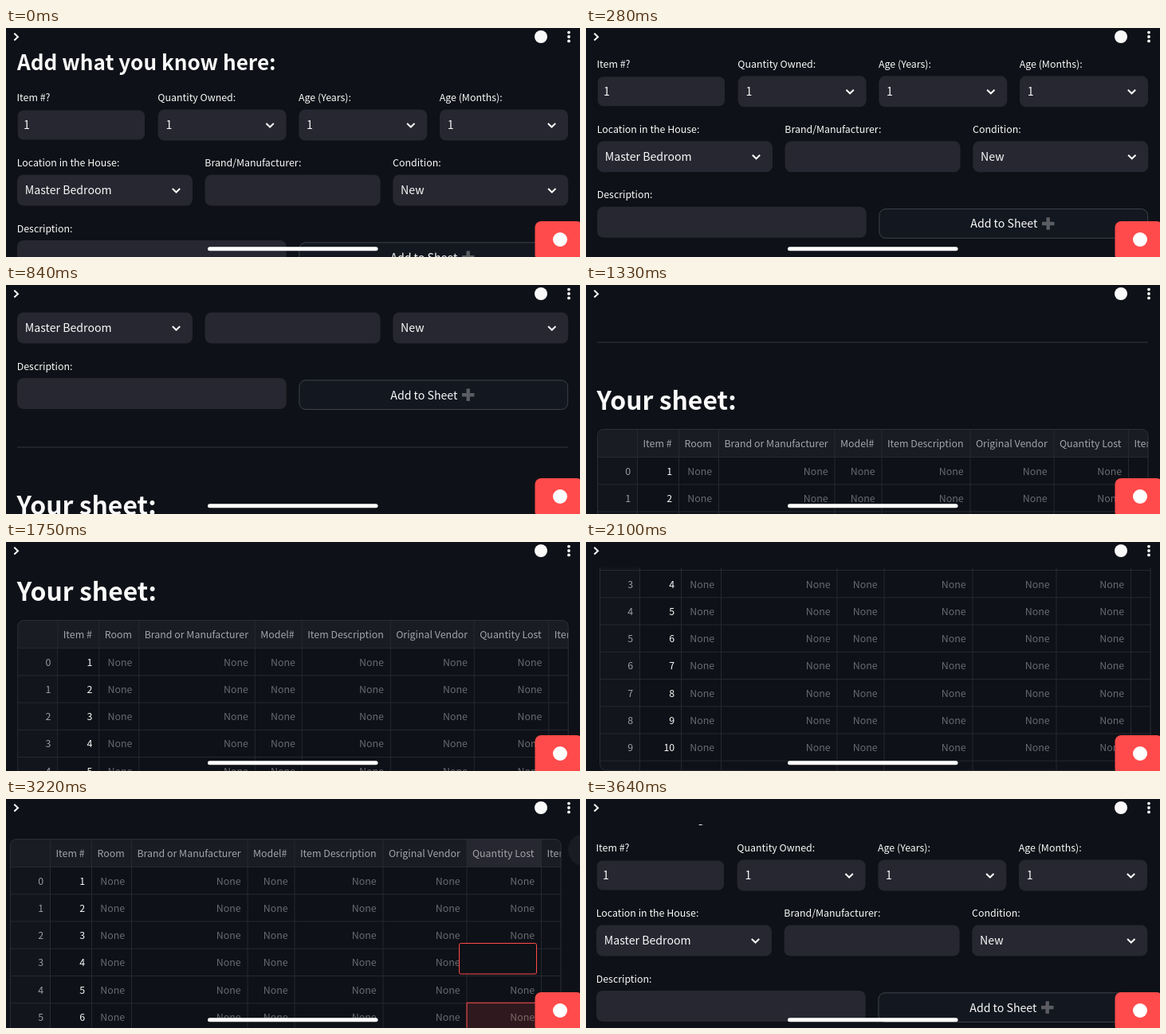
Animation of 720x288 px, one loop 3.71 s. Source, as an HTML page with a canvas:

```html
<!DOCTYPE html>
<html lang="en">
<head>
<meta charset="utf-8">
<title>Inventory form scroll</title>
<style>
html, body { margin: 0; width: 100%; height: 100%; overflow: hidden; background: #0e1117; }
canvas { display: block; }
</style>
</head>
<body>
<canvas id="stage" width="720" height="288"></canvas>
<script>
const ctx = document.getElementById('stage').getContext('2d');
const LOOP = 3710, STEP = 70;
const BG = '#0e1117', FIELD = '#262730', INK = '#fafafa', GRID = '#26292f', RED = '#ff4b4b';
const FAMILY = '"Noto Sans CJK JP", "Noto Sans CJK SC", "Noto Sans", sans-serif';
const LABEL = 12.4, VALUE = 14.15;

// [time, value] keys: vertical scroll and sideways drift of the page
const scrollKeys = [[0, 0], [560, 108], [840, 150], [1050, 150], [1330, 282], [1540, 330], [1610, 330],
  [2100, 565.7], [2590, 743.5], [2730, 752], [2800, 752], [3150, 488], [3220, 413], [3640, 26], [3710, 0]];
const driftKeys = [[0, 0], [1610, 0], [2100, 3], [2170, 8], [2280, 13], [2590, 0], [2870, 0],
  [3150, -18], [3220, -9], [3640, -1], [3710, 0]];

// Monotone cubic interpolation
function sample(keys, t) {
  const slope = i => keys[i + 1] && keys[i] ? (keys[i + 1][1] - keys[i][1]) / (keys[i + 1][0] - keys[i][0]) : 0;
  const tangent = i => {
    const a = slope(i - 1), b = slope(i);
    return a * b > 0 ? 2 * a * b / (a + b) : 0;
  };
  let i = 0;
  while (i < keys.length - 2 && t >= keys[i + 1][0]) i++;
  const [t0, v0] = keys[i], [t1, v1] = keys[i + 1];
  const h = t1 - t0, u = (t - t0) / h, w = 1 - u;
  return w * w * (1 + 2 * u) * v0 + u * u * (3 - 2 * u) * v1
    + h * u * w * (w * tangent(i) - u * tangent(i + 1));
}

function text(str, x, y, size, color = INK, align = 'left', weight = 400) {
  ctx.font = `${weight} ${size}px ${FAMILY}`;
  ctx.textAlign = align;
  ctx.fillStyle = color;
  ctx.fillText(str, x, y);
}

function rect(x, y, w, h, color) {
  ctx.fillStyle = color;
  ctx.fillRect(x, y, w, h);
}

function box(x, y, w, h, r, fill, stroke) {
  ctx.beginPath();
  ctx.roundRect(x, y, w, h, r);
  if (fill) { ctx.fillStyle = fill; ctx.fill(); }
  if (stroke) { ctx.strokeStyle = stroke; ctx.lineWidth = 1; ctx.stroke(); }
}

function disc(x, y, r, color) {
  ctx.beginPath();
  ctx.arc(x, y, r, 0, 7);
  ctx.fillStyle = color;
  ctx.fill();
}

function line(points, color, width) {
  ctx.beginPath();
  points.forEach(([x, y]) => ctx.lineTo(x, y));
  ctx.strokeStyle = color;
  ctx.lineWidth = width;
  ctx.stroke();
}

function field(label, x, y, w, value, isSelect) {
  text(label, x - .3, y - 10.5, LABEL);
  box(x, y, w, 39, 8, FIELD);
  if (value) text(value, x + 9.8, y + 24.8, VALUE);
  if (isSelect) {
    const cx = x + w - 20.5;
    line([[cx - 4.7, y + 17.5], [cx, y + 22], [cx + 4.7, y + 17.5]], INK, 2);
  }
}

function drawForm() {
  text('Add what you know here:', 14, 52.5, 26.1, INK, 'left', 600);

  text('Item #?', 13.4, 92, LABEL);
  box(14.7, 103.5, 159.3, 37, 7, FIELD);
  text('1', 22, 127.3, VALUE);
  ['Quantity Owned:', 'Age (Years):', 'Age (Months):'].forEach((label, i) =>
    field(label, 190.6 + 176.7 * i, 102.5, 161, '1', true));

  field('Location in the House:', 14, 184.5, 220, 'Master Bedroom', true);
  field('Brand/Manufacturer:', 249.6, 184.5, 220);
  field('Condition:', 485.3, 184.5, 220, 'New', true);

  field('Description:', 14, 267, 337.7);
  box(367.9, 269.8, 336.8, 36.7, 8, '#131720', '#3f4248');
  text('Add to Sheet', 482.3, 293.5, VALUE);
  rect(572, 286, 15.5, 4.4, '#5b5d62');
  rect(577.5, 280.4, 4.4, 15.5, '#5b5d62');

  rect(14, 353.5, 691, 1, '#34373d');
  text('Your sheet:', 13.6, 439, 31.9, INK, 'left', 700);
}

const columns = ['', 'Item #', 'Room', 'Brand or Manufacturer', 'Model#', 'Item Description',
  'Original Vendor', 'Quantity Lost', 'Item Age'];
const edges = [14, 64.5, 116.5, 166.5, 312, 371, 482, 587, 680.5, 775];
const TOP = 463, ROWS_TOP = 498.5, ROW = 34.25, BOTTOM = 853.5, LOST = 7, PICKED = 5;

function drawTable(picked) {
  ctx.save();
  ctx.beginPath();
  ctx.roundRect(14, TOP, 691.5, BOTTOM - TOP, 8);
  ctx.clip();
  rect(14, TOP, 692, ROWS_TOP - TOP, '#1a1c24');
  rect(14, ROWS_TOP, 50.5, BOTTOM - ROWS_TOP, '#12151c');
  if (picked) rect(edges[LOST], TOP, edges[LOST + 1] - edges[LOST], ROWS_TOP - TOP, FIELD);

  columns.forEach((name, c) => {
    const right = edges[c + 1] - 8.3;
    text(name, edges[c] + 6.9, 486, LABEL, '#a2a4a8');
    for (let r = 0; r < 10; r++) {
      const y = 520.5 + ROW * r;
      if (c === 0) text(r, right, y, LABEL, '#9c9ea2', 'right');
      else if (c === 1) text(r + 1, right, y, LABEL, INK, 'right');
      else text('None', right, y, LABEL, '#686a6f', 'right');
    }
    if (c) rect(edges[c] - .5, TOP, 1, BOTTOM - TOP, GRID);
  });
  for (let r = 0; r <= 10; r++) rect(14, ROWS_TOP + ROW * r - .5, 692, 1, GRID);

  if (picked) {
    box(edges[LOST], ROWS_TOP + ROW * PICKED - .5, edges[LOST + 1] - edges[LOST], ROW, 0,
      'rgba(255,75,75,.14)', RED);
  }
  ctx.restore();
  box(14.5, TOP + .5, 690.5, BOTTOM - TOP - 1, 8, null, '#2b2e34');
  if (picked) disc(734, 477, 20, '#1a1c24');
}

function drawFinish() {
  box(14.5, 876.3, 111, 36.7, 8, '#131720', '#45484e');
  text('Finished?', 26.2, 900, VALUE);
  box(93.5, 885, 19.3, 19, 3, '#12bd16', '#0b8f10');
  line([[97.5, 895], [101.5, 900], [109, 888.5]], '#fff', 2.6);
}

function drawChrome() {
  rect(0, 0, 720, 32, BG);
  line([[10.3, 6.8], [15, 11.2], [10.3, 15.6]], INK, 2);
  disc(671, 11, 8, INK);
  [5.6, 11, 16.4].forEach(y => disc(706, y, 1.9, INK));
  box(663.5, 243, 60, 50, 8, RED);
  disc(695, 266, 9, '#fff');
  box(253, 275.2, 213.5, 5, 2.5, '#fff');
}

function draw(now) {
  const t = Math.floor(now % LOOP / STEP) * STEP;
  rect(0, 0, 720, 288, BG);
  ctx.save();
  ctx.translate(sample(driftKeys, t), -sample(scrollKeys, t));
  drawForm();
  drawTable(t >= 3150);
  drawFinish();
  ctx.restore();
  // Cell editor stays put while the page moves
  if (t >= 3150 && t < 3430) box(568.5, 181.5, 97, 38.5, 2, BG, RED);
  drawChrome();
}

let start;
function tick(now) {
  start ??= now;
  draw(now - start);
  requestAnimationFrame(tick);
}
requestAnimationFrame(tick);
</script>
</body>
</html>
```
